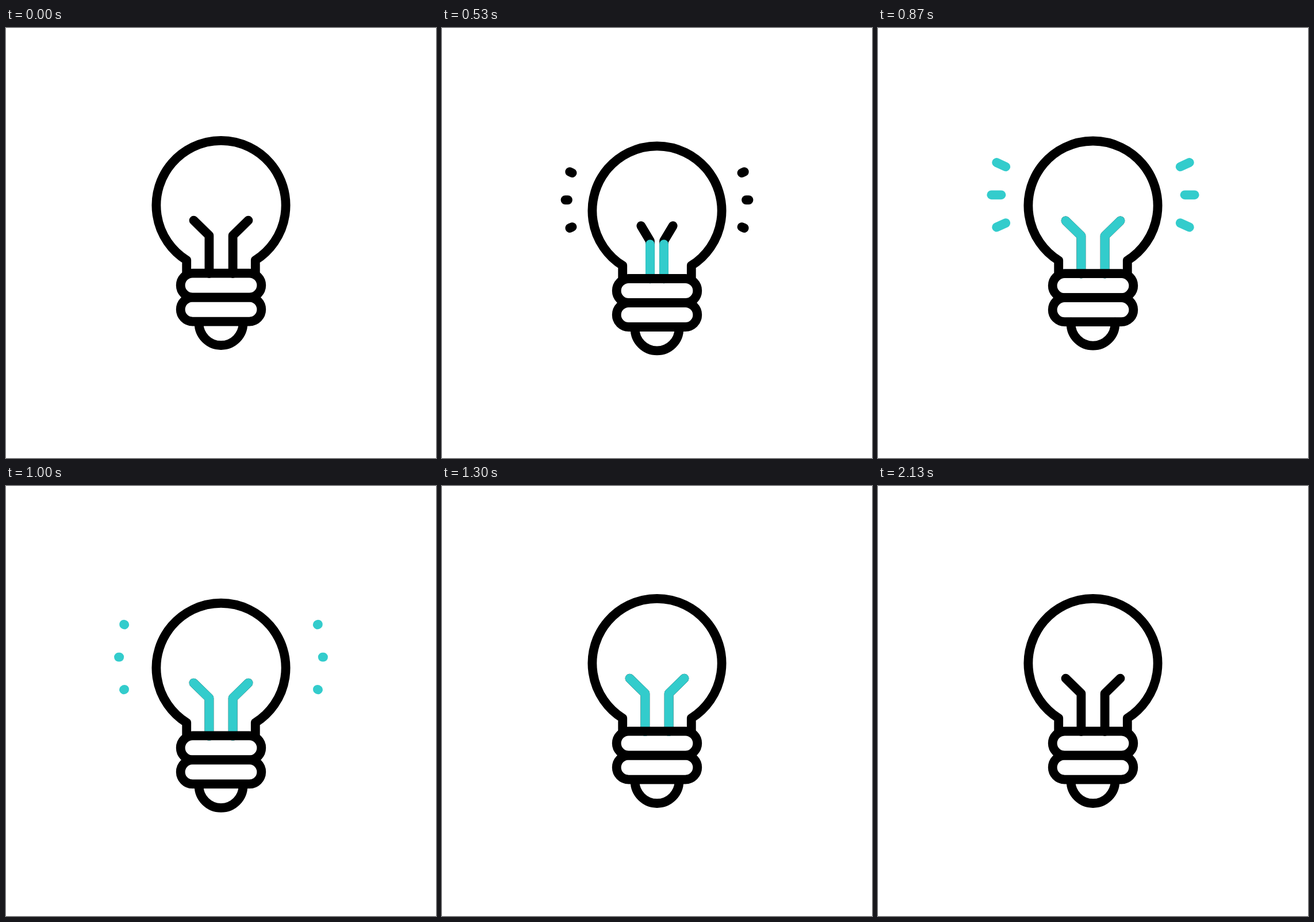
An HTML page for the animation above (2500 ms loop, 748 by 748 pixels).

```html
<!DOCTYPE html>
<html lang="en">
<head>
<meta charset="utf-8">
<title>Light bulb</title>
<style>
  html, body { margin: 0; height: 100%; overflow: hidden; background: #fff; }
  svg { display: block; width: 100vw; height: 100vh; }
  path, rect { fill: none; stroke: #000; stroke-width: 15.8; stroke-linecap: round; stroke-linejoin: round; }
  .lit { stroke: #33cccc; }
</style>
</head>
<body>
<svg viewBox="0 0 748 748">
  <g id="bulb">
    <g id="wires"></g>
    <path d="M314.2 427V403.9A112.6 112.6 0 1 1 433.8 403.9V427"/>
    <rect x="303.7" y="426.6" width="140.6" height="42" rx="21"/>
    <rect x="303.7" y="468.6" width="140.6" height="42" rx="21"/>
    <path d="M335.6 511V513.6A38.4 38.4 0 0 0 412.4 513.6V511"/>
    <g id="rays"></g>
  </g>
</svg>
<script>
const FPS = 30, LOOP = 2500, CENTER = 374;
const bulb = document.getElementById('bulb');

function addPath(parentId, className) {
  const path = document.createElementNS('http://www.w3.org/2000/svg', 'path');
  path.setAttribute('class', className);
  path.setAttribute('pathLength', 1);
  document.getElementById(parentId).append(path);
  return path;
}

// Eased progress from 0 to 1 between two moments, counted in ticks.
function ease(tick, from, to) {
  const p = Math.min(1, Math.max(0, (tick - from) / (to - from)));
  return p * p * (3 - 2 * p);
}

// Shows only the part of a path between two fractions of its length.
function trim(path, start, end) {
  path.style.visibility = end - start > 0.001 ? 'visible' : 'hidden';
  path.setAttribute('stroke-dasharray', `${end - start} 9`);
  path.setAttribute('stroke-dashoffset', -start);
}

const wires = [-1, 1].map(side => ({
  side, base: addPath('wires', ''), lit: addPath('wires', 'lit')
}));

const rays = [];
for (const side of [-1, 1]) {
  for (const row of [-1, 0, 1]) {
    const inner = row ? 147.5 : 155, outer = row ? 169 : 178;
    const d = `M${CENTER + side * inner} ${289.7 + row * 47}L${CENTER + side * outer} ${289.7 + row * 56.8}`;
    const ray = { dark: addPath('rays', ''), lit: addPath('rays', 'lit') };
    ray.dark.setAttribute('d', d);
    ray.lit.setAttribute('d', d);
    rays.push(ray);
  }
}

function draw(tick) {
  const at = (from, to) => ease(tick, from, to);

  const drop = 18 * (at(12.4, 19.4) - at(19.4, 26.8) + at(26.8, 33.8) - at(33.8, 39));
  bulb.setAttribute('transform', `translate(0 ${drop})`);

  const spread = 1 - 0.615 * (at(9, 20.3) - at(20.3, 26));
  const glow = at(9, 21) - at(52, 64);
  for (const { side, base, lit } of wires) {
    const bend = CENTER + side * 20.6 * spread, tip = CENTER + side * 47.5 * spread;
    const d = `M${bend} 427V361L${tip} 334.7`;
    base.setAttribute('d', d);
    lit.setAttribute('d', d);
    trim(lit, 0, glow);
  }

  for (const { dark, lit } of rays) {
    trim(dark, at(19, 25), at(14, 21));
    trim(lit, at(24, 31), at(20, 27));
  }
}

function loop() {
  const time = performance.now() % LOOP;
  draw(Math.floor((time + 4) * FPS / 1000));
  requestAnimationFrame(loop);
}
loop();
</script>
</body>
</html>
```
